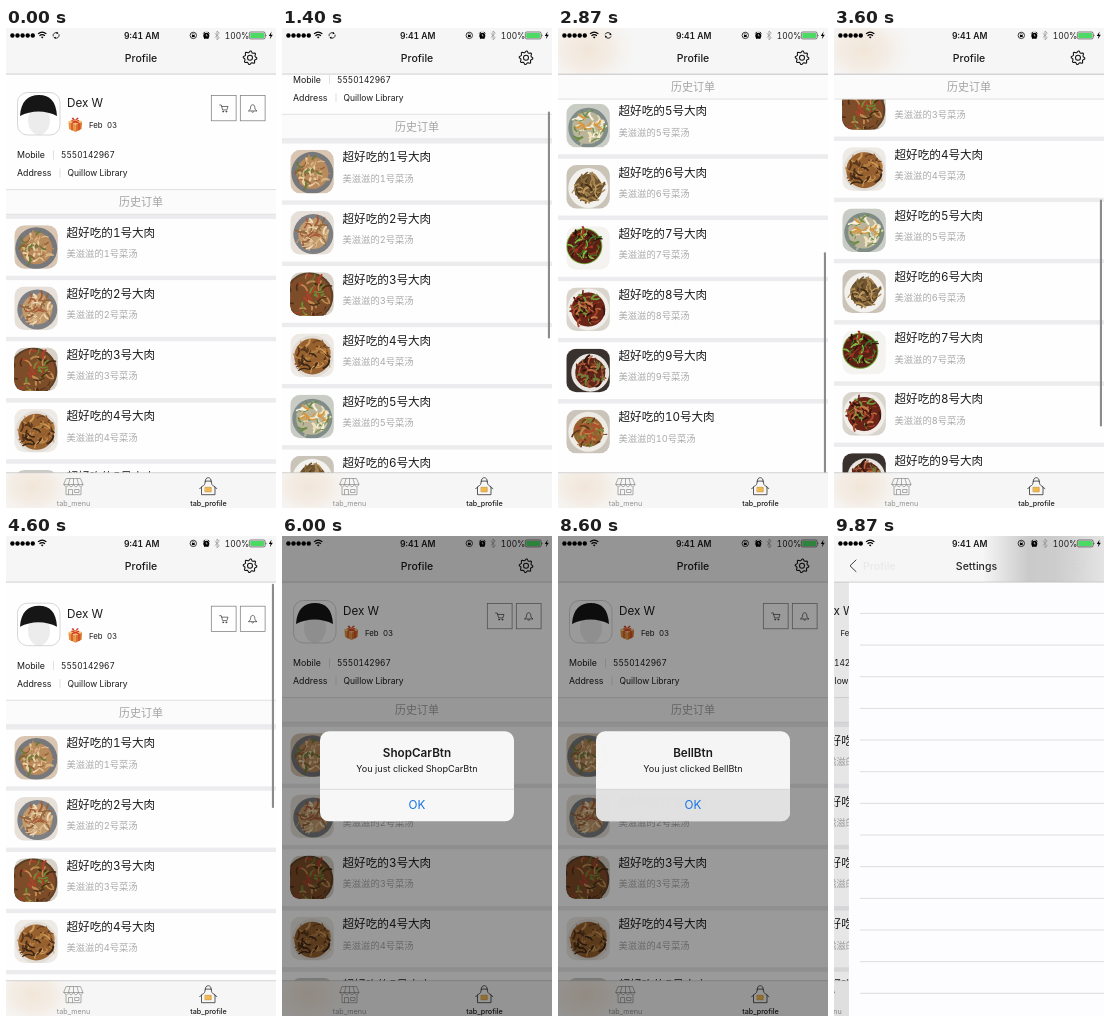
Write an HTML page that moves like this. It is 270 px wide and 480 px high and loops after 9940 ms.

```html
<!DOCTYPE html>
<html lang="zh-CN">
<head>
<meta charset="utf-8">
<title>Profile</title>
<style>
html, body { margin: 0; width: 100%; height: 100%; overflow: hidden; background: #fff; }
svg { display: block; width: 100vw; height: 100vh; }
text { font-family: Inter, "Noto Sans CJK SC", "Noto Sans CJK", sans-serif; font-feature-settings: "tnum"; fill: #1a1a1a; }
.mid { text-anchor: middle; }
.line { fill: none; stroke: #333; stroke-width: .8; stroke-linecap: round; stroke-linejoin: round; }
.frame { fill: none; stroke: #777; stroke-width: .7; }
.title { font-size: 10.5px; font-weight: 500; }
.info { font-size: 8.8px; }
.tab { font-size: 7.2px; }
.dish { font-size: 11.6px; }
.soup { font-size: 9.3px; fill: #aaa; }
</style>
</head>
<body>
<svg viewBox="0 0 270 480" preserveAspectRatio="none">
  <defs>
    <clipPath id="photo"><rect width="43.5" height="43.5" rx="10"/></clipPath>
    <clipPath id="face"><rect x="11.5" y="64.5" width="42.5" height="42.5" rx="10"/></clipPath>
    <clipPath id="card"><rect x="38" y="195.3" width="194" height="90" rx="9"/></clipPath>
    <radialGradient id="warm">
      <stop offset="0" stop-color="#f0e2d2" stop-opacity=".85"/>
      <stop offset=".5" stop-color="#f3e8dc" stop-opacity=".6"/>
      <stop offset="1" stop-color="#f6f6f6" stop-opacity="0"/>
    </radialGradient>
    <linearGradient id="smoke">
      <stop offset=".55" stop-opacity="0"/><stop offset=".72" stop-opacity=".19"/>
      <stop offset=".82" stop-opacity=".18"/><stop offset="1" stop-opacity=".08"/>
    </linearGradient>
  </defs>

  <g id="page">
    <rect width="270" height="480" fill="#fefefe"/>
    <g id="content">
      <rect x="11.5" y="64.5" width="42.5" height="42.5" rx="10" fill="#fff"/>
      <g clip-path="url(#face)">
        <ellipse cx="33" cy="92" rx="11" ry="15" fill="#ececec"/>
        <path d="M14 88C15 73 22 67 33 67S50 73 51 88C40 82 25 82 14 88z" fill="#161616"/>
      </g>
      <rect class="frame" x="11.5" y="64.5" width="42.5" height="42.5" rx="10" style="stroke:#c4c4c4"/>
      <text x="61" y="79.3" font-size="11.7">Dex W</text>
      <g>
        <path d="M62.5 94l7 2.5v7.5l-6.5-3z" fill="#e8963c"/>
        <path d="M69.5 96.5l6.5-2.5-.5 7-6 3z" fill="#d87428"/>
        <path d="M62 93.5l7-2.5 7.5 2.5-7 3z" fill="#f6bd62"/>
        <path d="M65.5 92.5l7.5 2.7v7M73 92.5l-7 2.7v7" fill="none" stroke="#d23b32" stroke-width="1.2"/>
        <path d="M69 92.5c-4-1-4-3.5-1.5-2.7zM69 92.5c4-1 4.5-3.5 2-2.7z" fill="#d23b32"/>
      </g>
      <text x="83" y="100.3" font-size="7.8">Feb</text>
      <text x="101" y="100.3" font-size="7.8">03</text>
      <text class="info" x="11" y="130.2">Mobile</text>
      <text class="info" x="55" y="130.2" style="font-size:8.3px">5550142967</text>
      <text class="info" x="11" y="148.2">Address</text>
      <text class="info" x="61.5" y="148.2" style="font-size:8.5px">Quillow Library</text>
      <path d="M47.5 122.5v9M54 140.5v9" stroke="#d4d4d4" stroke-width=".7"/>
      <rect class="frame" x="205.3" y="67.5" width="24.8" height="25.3"/>
      <rect class="frame" x="234.3" y="67.5" width="24.8" height="25.3"/>
      <g class="line" transform="translate(217.7 80.2) scale(.86)">
        <path d="M-4.7-3.7h1.9L-1.3 2h5l1.3-4h-7.2"/>
        <circle cx="-.7" cy="4" r=".6"/><circle cx="3" cy="4" r=".6"/>
      </g>
      <path class="line" transform="translate(246.7 80.2) scale(.86)"
        d="M-4.6 3c2.200-1.200 2-2.600 2.200-4.300.2-1.700 1-2.700 2.400-2.700s2.200 1 2.400 2.700c.2 1.700 0 3.100 2.200 4.300zM-1 4.400q1 1 2 0"/>
      <g id="rows"></g>
    </g>
    <g id="section">
      <rect width="270" height="25.2" fill="#fbfbfb"/>
      <path d="M0 .3h270M0 25h270" stroke="#d6d6d8" stroke-width=".7"/>
      <text class="mid" x="135" y="16.600" font-size="11" style="fill:#a4a4a4">历史订单</text>
    </g>
    <rect id="thumb" x="265.9" width="2.1" rx="1" fill="#8b8b8d"/>
    <rect y="444.7" width="270" height="35.3" fill="#f6f6f6"/>
    <svg y="444.7" width="270" height="35.3"><ellipse cx="27" cy="14" rx="46" ry="36" fill="url(#warm)"/></svg>
    <path d="M0 444.7h270" stroke="#b9b9b9" stroke-width=".6"/>
    <g class="line" style="stroke:#8c8c8c;stroke-width:.7">
      <path d="M60.5 450.5h14l2.5 6h-19zM64 450.5l-1.600 6M67.5 450.5v6M71 450.5l1.600 6"/>
      <path d="M58 456.5q2.400 4.600 4.700 0q2.400 4.600 4.800 0q2.400 4.600 4.800 0q2.300 4.600 4.700 0M60 459.500v7.200h15v-7.200M62.5 466.500v-5h4v5M69 461.500h4v3h-4z"/>
    </g>
    <g class="line" style="stroke:#333">
      <path d="M199.2 453.5c0 2.500-.8 4.200-3.700 5.200v8h13.500v-8c-2.900-1-3.700-2.700-3.700-5.200zM199.300 453.500c-.6-5.200 6.500-5.200 5.900 0M195.500 459.500l-1.800 1M209 459.500l1.800 1"/>
      <rect x="199.3" y="459.3" width="5.900" height="4.500" style="fill:#f3b84c;stroke:#c58a2a;stroke-width:.6"/>
    </g>
    <text class="tab mid" x="67.5" y="477.700" style="fill:#929292">tab_menu</text>
    <text class="tab mid" x="202.5" y="477.700" font-weight="500">tab_profile</text>
    <rect id="shade" width="270" height="480" opacity="0"/>
  </g>

  <g id="settings">
    <rect width="270" height="480" fill="#fdfcfe"/>
    <path id="rules" stroke="#d6d5d8" stroke-width=".8"/>
  </g>

  <rect width="270" height="46.1" fill="#f6f6f6"/>
  <svg width="270" height="46.1"><ellipse id="glow" cx="30" cy="22" rx="52" ry="42" fill="url(#warm)"/></svg>
  <rect id="haze" width="270" height="46.1" fill="url(#smoke)"/>
  <path d="M0 46.1h270" stroke="#b4b4b4" stroke-width=".6"/>
  <text id="profileTitle" class="title mid" y="34.3">Profile</text>
  <text id="settingsTitle" class="title mid" y="34.3">Settings</text>
  <path id="back" class="line" d="M22 24l-6 5.800 6 5.800" style="stroke-width:1"/>
  <path id="gear" class="line" style="stroke:#111;stroke-width:1.05"/>

  <g id="status">
    <g id="dots"></g>
    <path d="M36.2 10.500l-1.300-1.500q1.300-1 2.600 0z"/>
    <path d="M33.5 7.700q2.700-2.300 5.400 0M32 5.900q4.200-3.600 8.400 0" fill="none" stroke="#000" stroke-width="1.2"/>
    <g id="sync">
      <path d="M-2.900 1.100a3 3 0 0 1 4.500-3.400M2.900-1.100a3 3 0 0 1-4.500 3.400" fill="none" stroke="#222" stroke-width=".9"/>
      <path d="M.6-3.600l1.900 1.500-2.200.8zM-.6 3.600l-1.900-1.500 2.200-.8z"/>
    </g>
    <text class="mid" x="135.8" y="10.600" font-size="8.600" font-weight="600">9:41 AM</text>
    <circle cx="187.300" cy="7.400" r="3.200" fill="none" stroke="#111" stroke-width=".8"/>
    <rect x="185.900" y="7" width="2.800" height="2.100"/>
    <path d="M186.400 7V6.200a.9.900 0 0 1 1.800 0V7" fill="none" stroke="#111" stroke-width=".5"/>
    <circle cx="200.300" cy="7.700" r="3"/>
    <path d="M197.300 5.500l1.700-1.700M203.300 5.500l-1.700-1.700M198.300 11l.8-1M202.300 11l-.8-1" stroke="#000"/>
    <path d="M200.300 6v1.900h1.300" fill="none" stroke="#fff" stroke-width=".6"/>
    <path d="M208.700 5.100l4.600 4.600-2.300 2.100V3l2.300 2.100-4.600 4.600" fill="none" stroke="#8e8e8e" stroke-width=".7"/>
    <text x="218.800" y="10.500" font-size="8.400">100%</text>
    <rect x="243.300" y="4" width="15.800" height="6.900" rx="1.400" fill="none" stroke="#222" stroke-width=".6"/>
    <rect x="244.200" y="4.900" width="14" height="5.100" rx=".7" fill="#4cd964"/>
    <path d="M259.700 6.200q1.400 1.200 0 2.500z"/>
    <path d="M265.600 3.500l-2.800 4.400h1.800l-.8 3.400 3-4.500h-1.900z"/>
  </g>

  <rect id="dim" width="270" height="480"/>
  <g id="alert">
    <rect x="38" y="195.3" width="194" height="90" rx="9" fill="#f7f7f7"/>
    <rect id="press" x="38" y="253.5" width="194" height="32" fill="#e2e2e3" clip-path="url(#card)"/>
    <path d="M38 253.3h194" stroke="#cfcfd1" stroke-width=".7"/>
    <text id="alertTitle" class="mid" x="135" y="220.8" font-size="11.7" font-weight="600"></text>
    <text id="alertBody" class="mid" x="135" y="235.6" font-size="9.1"></text>
    <text class="mid" x="135" y="273.4" font-size="11.7" style="fill:#1673e6">OK</text>
  </g>
</svg>
<script>
const LOOP = 9940, BAR = 46.1, ROW = 61.2, SECTION_Y = 161.3, MAX = 360, SYNC_END = 3000;
const $ = id => document.getElementById(id);
const set = (id, attrs) => { for (const k in attrs) $(id).setAttribute(k, attrs[k]); };
const clamp = (v, a = 0, b = 1) => Math.min(b, Math.max(a, v));
const easeOut = p => 1 - (1 - p) ** 3;
const list = (n, f) => Array.from({ length: n }, (_, i) => f(i)).join('');

function random(seed) {
  let s = seed * 7919 + 13;
  return () => (s = s * 16807 % 2147483647) / 2147483647;
}

// background, plate, plate centre x/y, plate radius, food radius, food tones
const DISHES = [
  ['#d8c6b2', '#77787b', 22, 23, 21, 16, '#b98a5c #ead0a4 #8e5f38 #d9b482 #6f7a3c'],
  ['#e6e0d9', '#7d7f82', 23, 23, 20, 15, '#c39a6c #f0dcb8 #94673f #dcbb8e #a65b38'],
  ['#d8d2c8', '#5d4028', 19, 24, 24, 22, '#7d4c28 #c08a50 #4c2d18 #6e8e35 #b0402a'],
  ['#eeeae5', '#e2ddd6', 22, 23, 21, 18, '#96602f #cf9a58 #5a361c #b57c40 #3d2716'],
  ['#c9cbc5', '#7f8c88', 22, 24, 20, 16, '#b9b49a #f0e3bd #d9973f #6e8c48 #f7f1dc'],
  ['#c9c3b8', '#f3f1ed', 22, 23, 20, 14, '#6e5430 #a58450 #443019 #8a6a3c #c29b60'],
  ['#f4f3ef', '#6aa335', 18, 20, 18, 17, '#5a2016 #a23420 #2c100c #7fbb42 #3f7a25'],
  ['#d9d4cc', '#f1eeea', 22, 22, 21, 17, '#6a2418 #a8482a #34130d #6f9a3a #c97a48'],
  ['#39312d', '#e9e5e1', 24, 24, 19, 15, '#5f2519 #9a4a2d #33140e #6e7f3a #b9683f'],
  ['#cbc4ba', '#eeeae4', 22, 22, 20, 15, '#96602f #be8648 #5a361c #76893d #b34a2d']
];

function photo([back, plate, x, y, R, r, tones], i) {
  const rnd = random(i + 1), colors = tones.split(' ');
  const strand = k => {
    const a = rnd() * 6.28, d = Math.sqrt(rnd()) * r * .95, turn = rnd() * 6.28;
    const px = x + d * Math.cos(a), py = y + d * Math.sin(a), l = 2 + rnd() * 3;
    const dx = l * Math.cos(turn), dy = l * Math.sin(turn);
    return `<path d="M${px - dx} ${py - dy}q${dx - dy * .6} ${dy + dx * .6} ${2 * dx} ${2 * dy}" fill="none"
      stroke="${colors[k % 5]}" stroke-width="${.8 + rnd() * 1.4}" stroke-linecap="round"/>`;
  };
  return `<rect width="44" height="44" fill="${back}"/>
    <circle cx="${x}" cy="${y}" r="${R}" fill="${plate}"/>
    <circle cx="${x}" cy="${y}" r="${r}" fill="${colors[0]}"/>` + list(55, strand);
}

$('rows').innerHTML = list(10, i => `<g transform="translate(0 ${186.5 + ROW * i})">
  <rect width="270" height="4.4" fill="#ececee"/>
  <g transform="translate(8.3 10.7)" clip-path="url(#photo)">${photo(DISHES[i], i)}</g>
  <text class="dish" x="60.5" y="22.2">超好吃的${i + 1}号大肉</text>
  <text class="soup" x="60.5" y="42.5">美滋滋的${i + 1}号菜汤</text></g>`);
$('dots').innerHTML = list(5, i => `<circle cx="${6.4 + 5.1 * i}" cy="7.5" r="2.2"/>`);
set('rules', { d: list(13, i => `M11 ${77.4 + 31.66 * i}h259`) });

function gearPath() {
  const teeth = list(32, i => {
    const r = i % 4 < 2 ? 6.8 : 5.3, a = (i + (i % 2 ? -.15 : .15)) * Math.PI / 16;
    return `${i ? 'L' : 'M'}${244 + r * Math.cos(a)} ${29.8 + r * Math.sin(a)}`;
  });
  return teeth + 'zM246.5 29.8a2.5 2.5 0 1 1-5 0a2.5 2.5 0 1 1 5 0z';
}
set('gear', { d: gearPath() });

// time, offset
const SCROLL = [[1030, 0], [1250, 30], [1550, 120], [2000, 203], [2400, 300], [2700, 355], [2850, 366],
  [3150, 360], [3350, 347], [3600, 262], [3900, 125], [4200, 12], [4350, -12], [4600, -2.7], [4900, 0]];

function offsetAt(t) {
  const n = SCROLL.length - 1;
  if (t <= SCROLL[0][0] || t >= SCROLL[n][0]) return 0;
  const i = SCROLL.findIndex(p => p[0] > t) - 1;
  const slope = k => k < 1 || k >= n ? 0 :
    (SCROLL[k + 1][1] - SCROLL[k - 1][1]) / (SCROLL[k + 1][0] - SCROLL[k - 1][0]);
  const [t0, a] = SCROLL[i], [t1, b] = SCROLL[i + 1], h = t1 - t0, u = (t - t0) / h;
  return a + (b - a) * u * u * (3 - 2 * u) +
    h * u * (1 - u) * (slope(i) * (1 - u) - slope(i + 1) * u);
}

const ALERTS = [
  { name: 'ShopCarBtn', open: 5230, press: 6730, close: 6860 },
  { name: 'BellBtn', open: 7390, press: 8470, close: 8600 }
];

function drawScroll(t) {
  const off = offsetAt(t), inside = clamp(off, 0, MAX);
  const length = 227 - Math.abs(off - inside);
  set('content', { transform: `translate(0 ${-off})` });
  set('section', { transform: `translate(0 ${Math.max(SECTION_Y - off, BAR)})` });
  set('glow', { opacity: clamp((off - 130) / 60) });
  set('thumb', {
    y: 47.8 + .473 * inside + (off > MAX ? 227 - length : 0),
    height: length,
    opacity: Math.min(clamp((t - 1030) / 60), clamp((5000 - t) / 200))
  });
}

function drawSync(t) {
  set('sync', {
    opacity: t < SYNC_END ? 1 : 0,
    transform: `translate(50.1 7.4) rotate(${t * .36 + t / SYNC_END * 90})`
  });
}

function drawAlert(t) {
  const a = ALERTS[t < 7360 ? 0 : 1];
  const shown = easeOut(clamp((t - a.open) / 320));
  const alpha = Math.min(clamp((t - a.open) / 220), 1 - easeOut(clamp((t - a.close) / 300)));
  const s = 1.18 - .18 * shown;
  $('alertTitle').textContent = a.name;
  $('alertBody').textContent = 'You just clicked ' + a.name;
  set('dim', { opacity: .4 * alpha });
  set('press', { opacity: t >= a.press ? 1 : 0 });
  set('alert', { opacity: alpha, transform: `translate(135 240.3) scale(${s}) translate(-135 -240.3)` });
}

function drawPush(t) {
  const w = Math.max(0, t - 9550) * .0144;
  const left = (1 + w) * Math.exp(-w), done = 1 - left;
  set('page', { transform: `translate(${-81 * done} 0)` });
  set('shade', { opacity: .1 * done });
  set('settings', { transform: `translate(${270 * left} 0)` });
  set('haze', { opacity: done });
  set('profileTitle', { x: 135 - 95 * done, opacity: left });
  set('settingsTitle', { x: 135 + 135 * left, opacity: done });
  set('back', { opacity: done });
  set('gear', { opacity: (t >= 9400 ? .3 : 1) * left });
}

function draw(now) {
  const t = now % LOOP;
  drawScroll(t);
  drawSync(t);
  drawAlert(t);
  drawPush(t);
}

const start = performance.now();
function tick() {
  draw(performance.now() - start);
  requestAnimationFrame(tick);
}
tick();
</script>
</body>
</html>
```
